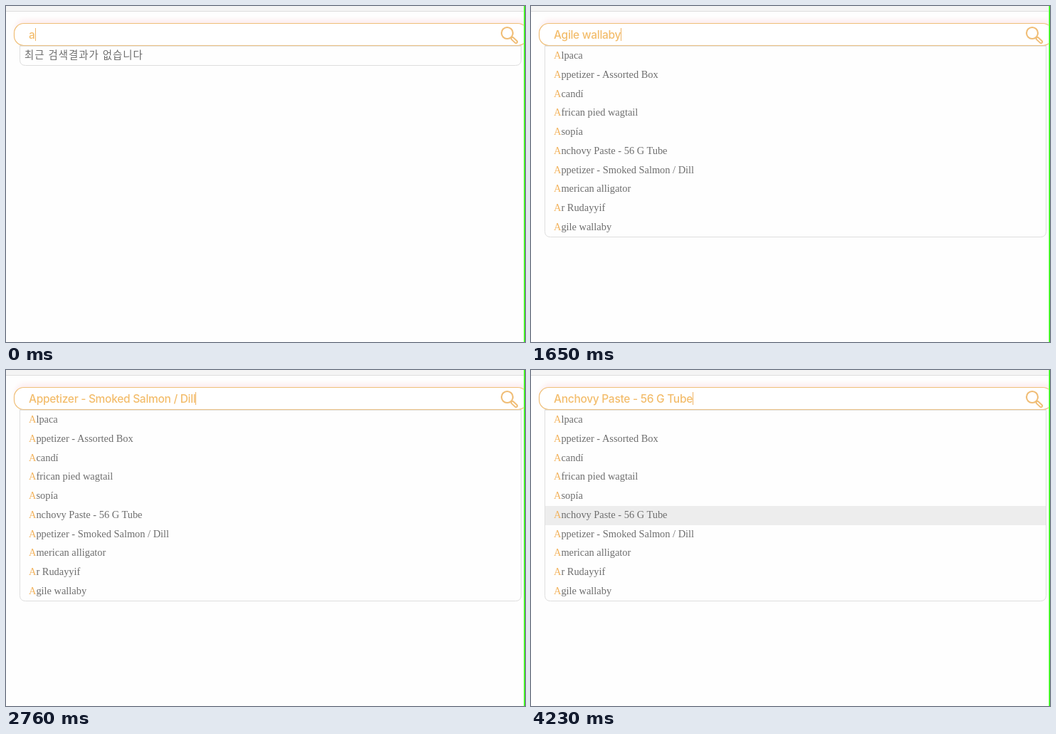
These frames come from a looping animation (729 by 472 pixels, 4440 ms). An HTML page:

```html
<!DOCTYPE html>
<html lang="ko">
<head>
<meta charset="utf-8">
<style>
  html, body { margin: 0; width: 100%; height: 100%; overflow: hidden; background: #fefefe; }
  svg { display: block; width: 729px; height: 472px; }
  text { white-space: pre; }
  .query { font: 500 15.5px Inter, Roboto, sans-serif; letter-spacing: -.29px; fill: #f3bd6c; }
  .item { font: 14.4px "Liberation Serif", "Times New Roman", serif; fill: #6e6e6e; }
  .item .hit { fill: #f3b561; }
  .empty { font: 300 14.4px "Noto Sans CJK KR", "Noto Sans CJK", serif; letter-spacing: 1px; fill: #6e6e6e; }
</style>
</head>
<body>
<svg viewBox="0 0 729 472">
  <defs><filter id="soft" x="-5%" y="-80%" width="110%" height="260%"><feGaussianBlur stdDeviation="3"/></filter></defs>
  <rect width="729" height="472" fill="#fefefe"/>
  <rect width="729" height="7" fill="#f4f4f4"/>
  <rect y="7" width="729" height="1" fill="#dedede"/>

  <rect x="13" y="19" width="722" height="34" rx="14" fill="#fdeef0" filter="url(#soft)"/>
  <path id="panel" fill="#fefefe" stroke="#dedede"/>
  <rect id="mark" x="20" width="703" fill="#ededed"/>
  <g id="list"></g>
  <text id="empty" class="empty" x="26" y="74">최근 검색결과가 없습니다</text>

  <rect x="11.5" y="24.5" width="721" height="31" rx="13.5" fill="#fff" stroke="#efbf78" stroke-width="1.2"/>
  <path d="M20 56.3H723" stroke="#d9d5ce" stroke-width=".8"/>
  <text id="query" class="query" x="32" y="46"></text>
  <rect id="caret" y="31" width="1" height="18" fill="#efb566"/>

  <g fill="none" stroke="#f0bd75" stroke-linecap="round">
    <path d="M709.5 43.5L712 46" stroke-width="2"/>
    <path d="M711.5 45.8L716.3 50.3" stroke-width="5.6"/>
    <path d="M711.5 45.8L716.3 50.3" stroke="#fff" stroke-width="1.8"/>
    <circle cx="704" cy="38" r="8" fill="#fff" stroke-width="2.1"/>
  </g>
  <rect x="727" width="1" height="472" fill="#8dff7c"/>
  <rect x="728" width="1" height="472" fill="#25f500"/>
</svg>
<script>
const LOOP = 4440, PITCH = 26.75;
const OPEN = 330, FIRST = 570, REPEAT = 810, STOP = 3330, STEP = 30;
const CARET_OFF = 3720, CARET_ON = 4230;

const items = [
  "Alpaca", "Appetizer - Assorted Box", "Acandí", "African pied wagtail", "Asopía",
  "Anchovy Paste - 56 G Tube", "Appetizer - Smoked Salmon / Dill", "American alligator",
  "Ar Rudayyif", "Agile wallaby"
];

const $ = id => document.getElementById(id);
const show = (el, on) => el.setAttribute("visibility", on ? "visible" : "hidden");
const clamp = v => Math.max(0, Math.min(1, v));

$("list").innerHTML = items.map((s, i) =>
  `<text class="item" x="32" y="${74 + i * PITCH}"><tspan class="hit">${s[0]}</tspan>${s.slice(1)}</text>`
).join("");

const panelPath = bottom =>
  `M19.5 55.5V${bottom - 8}q0 8 8 8H715.5q8 0 8 -8V55.5Z`;

// Number of arrow-key presses so far, including auto-repeat.
function presses(t) {
  if (t < FIRST) return 0;
  if (t < REPEAT) return 1;
  return 2 + Math.floor((Math.min(t, STOP) - REPEAT) / STEP);
}

function render(t) {
  const open = t >= OPEN, n = presses(t);
  const row = (n + items.length - 1) % items.length;

  show($("list"), open);
  show($("empty"), !open);
  $("panel").setAttribute("d", panelPath(open ? 324.5 : 83.5));

  const text = n ? items[row] : "a";
  if ($("query").textContent !== text) $("query").textContent = text;
  $("caret").setAttribute("x", Math.round(32 + $("query").getComputedTextLength()));
  show($("caret"), t < CARET_OFF || t >= CARET_ON);

  // The row tint only fades in once the key rests.
  const rest = t < REPEAT ? t - FIRST : t - STOP;
  const top = Math.round(57 + row * PITCH);
  $("mark").setAttribute("y", top);
  $("mark").setAttribute("height", Math.round(57 + (row + 1) * PITCH) - top);
  $("mark").setAttribute("opacity", n ? clamp((rest - 15) / 75) : 0);
}

const start = performance.now();
function tick() {
  render((performance.now() - start) % LOOP);
  requestAnimationFrame(tick);
}
tick();
</script>
</body>
</html>
```
